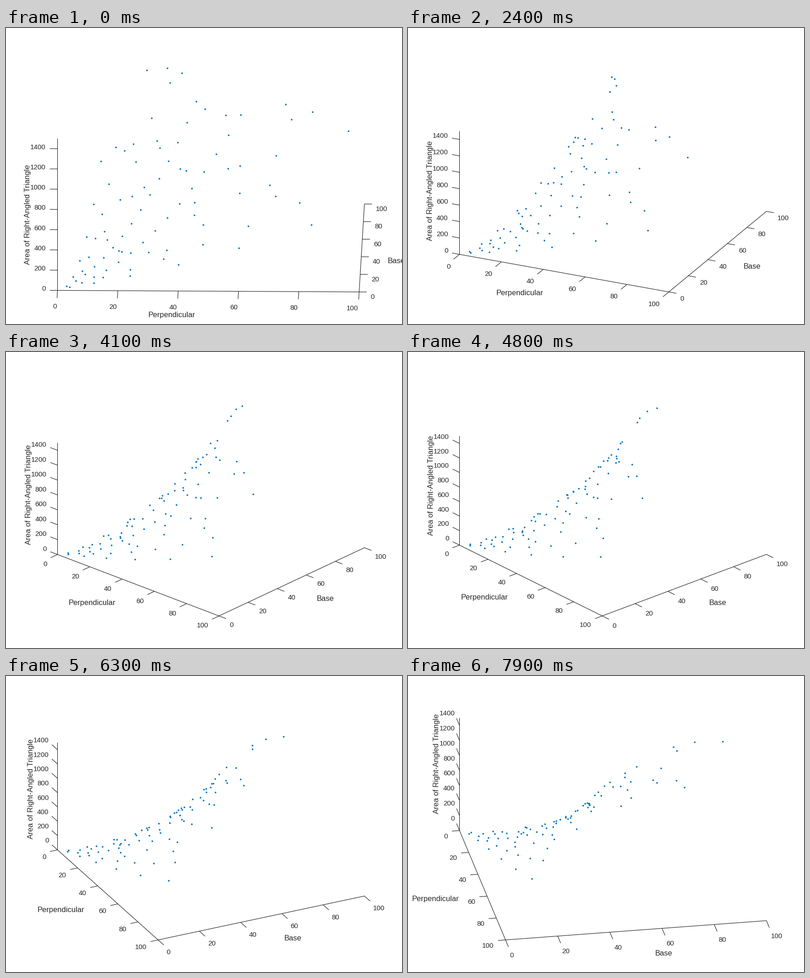
A matplotlib script for the animation above (8 s loop, 865 px wide and 647 px high).

```python
import numpy as np
import matplotlib.pyplot as plt
from matplotlib.animation import FuncAnimation
from matplotlib.collections import LineCollection

W, H, DPI = 865, 647, 100
LEFT, RIGHT, TOP, BOTTOM = 112.5, 782.9, 49.5, 576.9
FRAMES, INTERVAL = 80, 100
INK, BLUE = "#262626", "#0072bd"
ZMAX = 1500
TICK, LABEL_GAP = 16.7, 24.8

plt.rcParams["font.family"] = "Liberation Sans"


def px(size):
    return size * 72 / DPI


# Every right-angled triangle with whole sides, hypotenuse up to 100.
triples = np.array([
    (a, b, a * b / 2)
    for a in range(1, 100) for b in range(1, 100)
    if a * b / 2 <= ZMAX and a * a + b * b <= 10000
    and round((a * a + b * b) ** 0.5) ** 2 == a * a + b * b
])
unit = triples / (100, 100, ZMAX)

fig = plt.figure(figsize=(W / DPI, H / DPI), dpi=DPI, facecolor="white")
ax = fig.add_axes([0, 0, 1, 1])
ax.set_xlim(0, W)
ax.set_ylim(H, 0)
ax.axis("off")

lines = LineCollection([], colors="#1a1a1a", linewidths=px(1.1))
lines.set_snap(False)
ax.add_collection(lines)
dots = ax.scatter(unit[:, 0], unit[:, 1], s=np.full(len(unit), px(3.6) ** 2),
                  c=BLUE, linewidths=0, zorder=3)
dots.set_snap(False)


def add_text(s, size, ha, **kw):
    return ax.text(0, 0, s, fontsize=px(size), color=INK, ha=ha,
                   va="baseline", **kw)


hundreds = np.arange(0, 101, 20)
areas = np.arange(0, 1401, 200)
x_ticks = [add_text(str(v), 15, "right") for v in hundreds]
y_ticks = [add_text(str(v), 15, "left") for v in hundreds]
z_ticks = [add_text(str(v), 15, "right") for v in areas]
x_name = add_text("Perpendicular", 16.5, "right")
y_name = add_text("Base", 16.5, "left")
z_name = add_text("Area of Right-Angled Triangle", 16.5, "center",
                  rotation=90, rotation_mode="anchor")


def view(i):
    """Screen vectors of the three axes, stretched to fill the plot box."""
    az = np.radians(i + 1)
    el = np.radians(30.08 + 15.15 * np.sin(np.radians(0.93 * i)))
    ca, sa, ce, se = np.cos(az), np.sin(az), np.cos(el), np.sin(el)
    sx = (RIGHT - LEFT) / (ca + sa)
    sy = (BOTTOM - TOP) / (se * (ca + sa) + ce)
    return np.array([(sx * ca, sy * se * sa),
                     (sx * sa, -sy * se * ca),
                     (0, -sy * ce)])


def direction(v):
    return v / np.hypot(*v)


def draw(i):
    vx, vy, vz = basis = view(i)
    origin = np.array([LEFT, BOTTOM - vx[1]])
    corner = origin + vx
    segs = [(origin, corner), (corner, corner + vy), (origin, origin + vz)]

    def axis(start, vec, fractions, out, labels, shift, name, name_shift):
        for f, label in zip(fractions, labels):
            p = start + f * vec
            segs.append((p, p + TICK * out))
            label.set_position(p + LABEL_GAP * out + shift)
        name.set_position(start + vec / 2 + 24.5 * out + name_shift)

    axis(origin, vx, hundreds / 100, -direction(vy), x_ticks, (-0.6, 15),
         x_name, (-27, 32.7))
    axis(corner, vy, hundreds / 100, direction(vx), y_ticks, (0, 15),
         y_name, (32, 32.9))
    axis(origin, vz, areas / ZMAX, -direction(vx), z_ticks, (-0.6, 0.9),
         z_name, (-35.6, 0))

    lines.set_segments(segs)
    dots.set_offsets(origin + unit @ basis)
    return [lines, dots]


anim = FuncAnimation(fig, draw, frames=FRAMES, interval=INTERVAL,
                     init_func=lambda: draw(0), repeat=True, repeat_delay=0)
plt.show()
```
